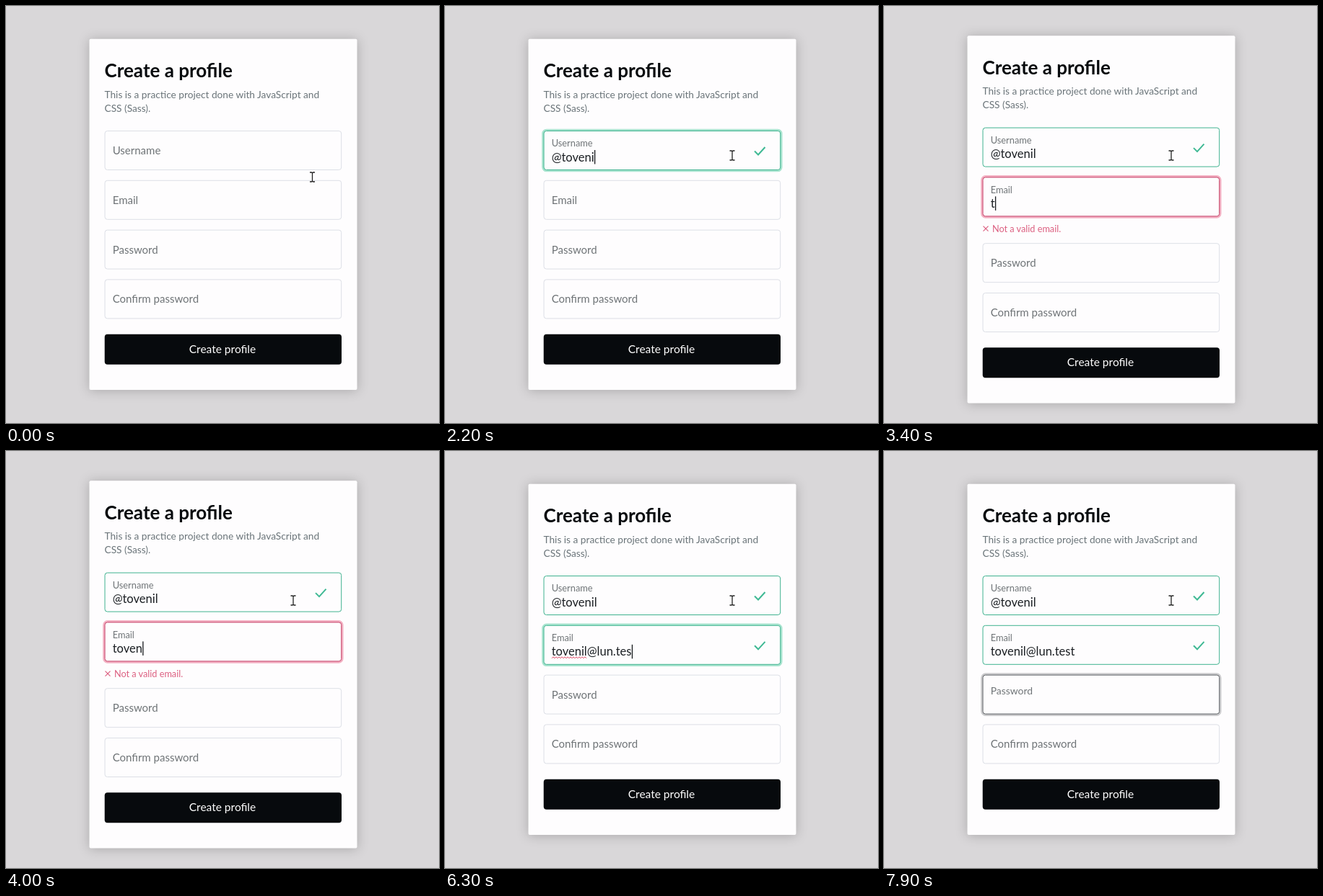
Animation of 600x579 px, one loop 8000 ms. Source, as an HTML page:

```html
<!DOCTYPE html>
<html lang="en">
<head>
<meta charset="utf-8">
<title>Create a profile</title>
<style>
  html, body { margin: 0; width: 100%; height: 100%; overflow: hidden; background: #d9d7d9; }
  svg { display: block; width: 600px; height: 579px; font-family: Lato, sans-serif; }
  #card { fill: #fefdfe; filter: drop-shadow(0 1px 8px rgba(0, 0, 0, .22)); }
  .title { font-size: 26px; font-weight: 700; fill: #070a0d; }
  .intro { font-size: 13.7px; fill: #6a7479; }
  .label { fill: #6f7477; }
  .value { font-size: 16.5px; fill: #1b1f23; }
  .button { font-size: 15.5px; fill: #fff; text-anchor: middle; }
  .check { fill: none; stroke: #3fb994; stroke-width: 2; }
  .squiggle { fill: none; stroke: #e0405f; stroke-width: 1; }
  #error text { font-size: 12.7px; fill: #dc5f80; }
  #error path { stroke: #dc5f80; stroke-width: 1.2; }
</style>
</head>
<body>
<svg viewBox="0 0 600 579">
  <rect id="card" x="115.5" width="371" rx="2"/>
  <g id="upper">
    <text class="title" x="136.5" y="99">Create a profile</text>
    <text class="intro" x="136.5" y="127.5">This is a practice project done with JavaScript and</text>
    <text class="intro" x="136.5" y="146.5">CSS (Sass).</text>
    <g id="error">
      <path d="M137.5 310l7 7m0 -7l-7 7"/>
      <text x="150" y="318">Not a valid email.</text>
    </g>
  </g>
  <g id="lower">
    <rect x="136.7" y="455.7" width="328.3" height="42" rx="4" fill="#070a0d"/>
    <text class="button" x="300" y="481.5">Create profile</text>
  </g>
  <g id="pointer" fill="none">
    <path stroke="#fff" stroke-width="2.6" stroke-opacity=".7" d="M0 -6V6"/>
    <path stroke="#222" stroke-width="1.3" d="M-3.5 -6.5H-1L0 -5.5L1 -6.5H3.5M0 -5.5V5.5M-3.5 6.5H-1L0 5.5L1 6.5H3.5"/>
  </g>
</svg>
<script>
const LOOP = 8000;
const COLORS = {
  idle: ['#dcdfe6', 'none'],
  neutral: ['#5d6165', '#cbcbcd'],
  valid: ['#3fb28f', '#a8e4cf'],
  invalid: ['#c43f66', '#f3b1c3']
};
const $ = id => document.getElementById(id);
const clamp = v => Math.max(0, Math.min(1, v));
const ease = v => v * v * (3 - 2 * v);
const mix = (a, b, p) => a + (b - a) * p;

function add(parent, tag, attrs, text = '') {
  const el = document.createElementNS('http://www.w3.org/2000/svg', tag);
  set(el, attrs);
  el.textContent = text;
  return parent.appendChild(el);
}
function set(el, attrs) {
  for (const name in attrs) el.setAttribute(name, attrs[name]);
}
function show(el, on) {
  el.style.display = on ? '' : 'none';
}

// keys: time of each typed character; validFrom: characters needed to pass
const fields = [
  { label: 'Username', value: '@tovenil', focus: 750, blur: 2880, validFrom: 1,
    keys: [1000, 1250, 1500, 1650, 1800, 2000, 2200, 2450] },
  { label: 'Email', value: 'tovenil@lun.test', focus: 2880, blur: 7800, validFrom: 14,
    keys: [3300, 3480, 3650, 3800, 3950, 4180, 4330, 4800, 5100, 5250, 5400, 5600, 5850, 6100, 6250, 6400] },
  { label: 'Password', value: '', focus: 7800, blur: LOOP, keys: [] },
  { label: 'Confirm password', value: '', focus: Infinity, blur: Infinity, keys: [] }
];

fields.forEach((f, i) => {
  const g = add($(i < 2 ? 'upper' : 'lower'), 'g', { transform: `translate(0 ${173 + i * 68.8})` });
  f.ring = add(g, 'rect', { x: 135.7, y: -.8, width: 330.3, height: 56.6, rx: 5, fill: 'none', 'stroke-width': 3 });
  f.border = add(g, 'rect', { x: 137, y: .5, width: 327.7, height: 54, rx: 3.5, fill: '#fefdfe' });
  f.name = add(g, 'text', { x: 147.7, class: 'label' }, f.label);
  f.text = add(g, 'text', { x: 147.7, y: 42.5, class: 'value' });
  f.caret = add(g, 'rect', { y: 27, width: 1.3, height: 19.5, fill: '#16191c' });
  f.check = add(g, 'path', { class: 'check', d: 'M429 28.5l5 5l9.5 -10.5' });
  f.squiggle = add(g, 'path', { class: 'squiggle' });
});

function drawField(f, t) {
  const typed = f.keys.filter(k => k <= t).length;
  const focused = t >= f.focus && t < f.blur;
  const state = typed ? (typed >= f.validFrom ? 'valid' : 'invalid') : focused ? 'neutral' : 'idle';
  const [line, glow] = COLORS[state];
  set(f.border, { stroke: line });
  set(f.ring, { stroke: focused ? glow : 'none' });

  const p = ease(clamp((t - f.focus) / 200));
  set(f.name, { y: mix(33, 22.2, p), 'font-size': mix(15, 12.8, p) });

  f.text.textContent = f.value.slice(0, typed);
  const width = typed ? f.text.getComputedTextLength() : 0;
  const lastEvent = typed ? f.keys[typed - 1] : f.focus;
  set(f.caret, { x: 148 + width });
  show(f.caret, focused && f.value && (t - lastEvent) % 1060 < 530);
  show(f.check, state === 'valid');

  const at = f.value.indexOf('@');
  const misspelt = focused && at > 0 && typed > at;
  show(f.squiggle, misspelt);
  if (misspelt) {
    let d = 'M148 46';
    const end = f.text.getSubStringLength(0, at);
    for (let x = 2, up = true; x <= end; x += 2, up = !up) d += `l2 ${up ? -2 : 2}`;
    set(f.squiggle, { d });
  }
  return state;
}

function draw(t) {
  const states = fields.map(f => drawField(f, t));
  const failed = states.includes('invalid');
  show($('error'), failed);
  set($('card'), { y: failed ? 41.3 : 45.8, height: failed ? 510.2 : 487.2 });
  set($('upper'), { transform: `translate(0 ${failed ? -4.4 : 0})` });
  set($('lower'), { transform: `translate(0 ${failed ? 18.6 : 0})` });

  const p = ease(clamp((t - 50) / 600));
  set($('pointer'), { transform: `translate(${mix(424.5, 398, p)} ${mix(237.5, 207.5, p)})` });
}

function tick() {
  draw(performance.now() % LOOP);
  requestAnimationFrame(tick);
}
tick();
</script>
</body>
</html>
```
